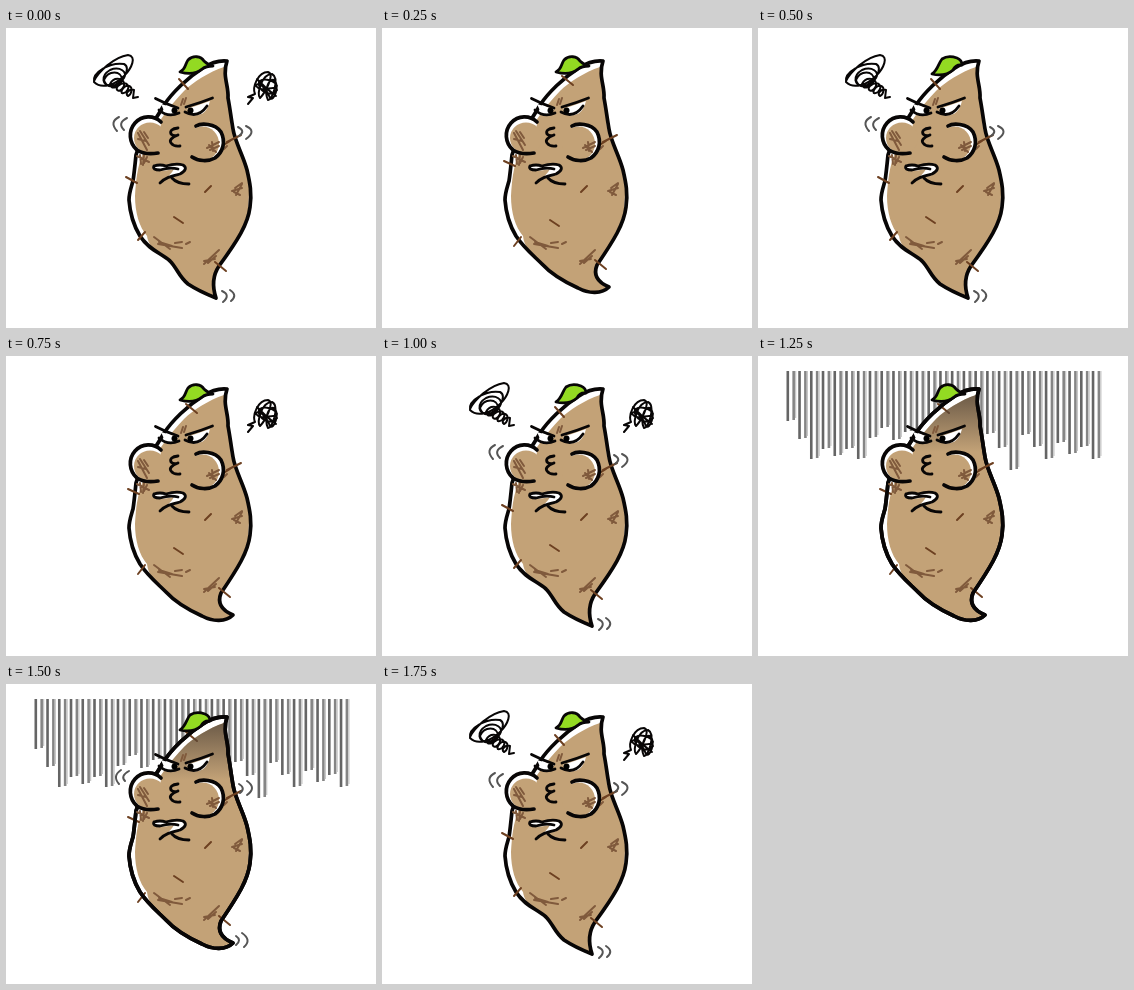
An HTML page for the animation above (2 s loop, 370 by 300 pixels).

```html
<!DOCTYPE html>
<html lang="en">
<head>
<meta charset="utf-8">
<title>Sulking sweet potato</title>
<style>
html, body { margin: 0; width: 100%; height: 100%; overflow: hidden; background: #fff; }
svg { display: block; width: 370px; height: 300px; }
path { fill: none; stroke-linecap: round; stroke-linejoin: round; }
.ink { stroke: #080606; stroke-width: 3.7; }
.mid { stroke-width: 2.8; }
.fine { stroke-width: 2; }
.hair { stroke: #6d4021; stroke-width: 2; }
.rough { stroke: #805a3c; stroke-width: 2; }
.shake { stroke: #555; stroke-width: 2; }
.white { fill: #fff; }
.tan { fill: #c3a277; }
.leaf { fill: #93da22; stroke: #080606; stroke-width: 2.8; }
</style>
</head>
<body>
<svg id="stage" viewBox="0 0 370 300"></svg>
<script>
const stage = document.getElementById('stage');
const path = (cls, d) => `<path class="${cls}" d="${d}"/>`;
const group = (id, inner) => `<g id="${id}">${inner}</g>`;

// Outline and colour fill share their upper parts; only the tail swings.
const head = 'M221 33C211 32 203 36 197 40C181 50 166 65 158 77C148 95 134 112 130 127C129 137 128 147 127 153C125 160 123 165 123 172C124 186 128 198 134 208';
const right = 'C232 212 242 196 244 179C246 165 244 155 241 142C237 127 229 114 227 101C225 90 224 80 222 70C223 58 216 48 221 33Z';
const fillHead = 'M218 39C203 44 187 54 178 63C164 78 148 97 137 125C131 140 130 152 129 168C129 184 133 199 141 208';
const fillRight = 'C226 220 237 202 242 184L244 150L225 100L220 45Z';
const tails = {
  up: 'C143 222 155 225 164 233C171 240 173 249 182 256C191 262 200 266 210 270C206 258 207 247 213 238',
  side: 'C142 220 151 227 160 236C171 248 185 255 196 260C207 266 220 266 227 259C215 254 211 247 215 237'
};
const hairs = {
  up: 'M173 51L182 61M120 149L131 155M132 212L139 204M209 234L220 243M168 189L177 195',
  side: 'M180 48L191 57M122 133L133 138M132 218L139 209M213 232L224 241M168 192L177 198'
};
const shakes = {
  up: 'M113 89Q103 94 111 103M121 90Q111 95 118 102M232 99Q240 103 233 108M240 98Q251 103 240 111M216 263Q225 267 217 274M224 262Q232 267 225 273',
  side: 'M115 86Q106 92 113 100M123 87Q114 92 119 97M233 100Q240 104 234 109M241 97Q251 104 241 111M230 252Q236 256 230 261M236 249Q246 256 238 263'
};
const outline = name => head + tails[name] + right;
const filling = name => fillHead + tails[name] + fillRight;

const torso = name => group(name,
  `<clipPath id="clip-${name}"><path d="${outline(name)}"/></clipPath>` +
  path('white', outline(name)) +
  `<g clip-path="url(#clip-${name})">${path('tan', filling(name))}</g>` +
  path('ink', outline(name)) + path('hair', hairs[name]));

const shadow = `<linearGradient id="gloom" gradientUnits="userSpaceOnUse" x1="0" y1="34" x2="0" y2="96">
  <stop stop-color="#55483b" stop-opacity=".85"/><stop offset="1" stop-color="#55483b" stop-opacity="0"/></linearGradient>
  <g clip-path="url(#clip-side)"><path d="${filling('side')}" style="fill:url(#gloom)"/></g>` +
  path('ink', outline('side'));

// Lengths of the gloomy stripes, left to right, one per pair.
const drops = [65, 83, 103, 93, 100, 93, 103, 82, 72, 84, 76, 90, 80, 88, 76, 90, 84, 78, 92, 114, 79, 91, 103, 87, 98, 91, 103];
function rain() {
  let out = '';
  for (let i = 0; i < 54; i++) {
    const x = 29.8 + i * 5.87;
    const end = drops[i >> 1] - (i % 2 ? 1 : 0);
    out += `<rect x="${x - 1.3}" y="15" width="2.6" height="${end - 15}" fill="${i % 2 ? '#858585' : '#656565'}"/>`;
    if (i % 2) out += `<rect x="${x + 1.3}" y="15" width="1.3" height="${end - 17}" fill="#c8c8c8"/>`;
  }
  return out;
}

const cheekLeft = 'M155 94C148 87 136 87 129 95C122 103 123 115 131 122C137 126 146 126 152 125';
const cheekRight = 'M190 98C195 95 209 95 215 104C220 114 217 124 209 130C202 134 192 133 186 129';
const cheeks =
  path('white', cheekLeft + 'Z') +
  '<ellipse class="tan" cx="144" cy="110" rx="16" ry="15.5"/>' +
  path('white', cheekRight + 'Z') +
  '<ellipse class="tan" cx="196.500" cy="115.500" rx="16.500" ry="17"/>' +
  path('rough', 'M132 105L141 122M134 103L143 117M138 104L142 110M132 111L140 113M131 128L143 134M134 127L135 136M138 127L137 137M141 129L138 135M201 120L213 114M203 117L210 124M204 122L213 118M206 114L207 123M218 121L221 118') +
  path('ink', cheekLeft) + path('ink', cheekRight);

const face =
  path('white', 'M155 76L172 81Q168 89 160 87Z') + path('white', 'M181 81L204 73Q200 89 187 87Z') +
  path('ink mid', 'M153 82Q162 90 173 85M179 84Q192 91 201 78') +
  '<circle cx="168.500" cy="82.500" r="3"/><circle cx="184.500" cy="82.500" r="3"/>' +
  path('ink mid', 'M149.500 70.500Q160 76 172 80M180 79Q194 75 206.500 70') +
  path('rough', 'M175 77L177 71M178 76L180 70') +
  path('ink mid', 'M172 100Q163 101 165 106Q168 109 172 107Q162 111 165 115Q168 119 174 118');

const arms =
  path('white', 'M148 137Q163 138 178 137Q181 142 172 146L156 153Q165 147 168 141Q152 144 148 141Z') +
  path('ink mid', 'M148 138Q154 136 160 138Q170 135 177 137Q183 141 174 146C166 148 160 149 154 155M148 138Q146 142 154 142Q164 139 172 141M166 150Q171 156 183 156');

const spots =
  path('hair', 'M221 114L235 107M199 164L205 158M216 118L224 113') +
  path('rough', 'M226 163L236 160M229 160L236 155M230 167L236 156M228 164L234 167M148 209L164 221M152 216L176 220M153 214L166 218M169 215L176 214M180 216L184 214M198 236L213 222M198 233L209 231M202 235L210 228');

const scribbleLeft = 'M88 53C92 44 108 29 122 27C131 28 126 40 118 48C110 56 96 62 88 54C86 44 104 34 118 36C126 40 116 56 106 58C96 58 94 48 104 42C114 38 122 44 118 50C110 62 100 60 98 52C102 42 116 42 116 52C114 60 104 62 104 56C108 48 120 50 118 58C114 66 108 62 112 58C120 52 126 58 120 64C114 68 114 62 120 58C128 56 126 66 122 68C118 66 124 60 128 62L127 70L132 69';
const scribbleRight = 'M249 66C246 59 252 44 262 44C270 46 258 66 254 70C250 66 256 46 266 46C274 50 266 73 262 72C258 64 262 50 268 52C274 58 268 74 264 70C260 60 252 52 250 58C256 66 268 56 271 62C264 70 251 62 253 54C258 48 270 54 271 58M251 51Q259 60 270 68M249 66L242 69L247 70L242 76';

const leaves = [
  'M174 44C180 41 179 36 182 32C187 27 195 28 198 33Q202 37 207 38Q200 38 196 41Q188 48 174 44Z',
  'M174 46C180 42 180 36 184 31Q190 27 199 30Q204 32 204 37Q198 36 195 42Q187 49 174 46Z'
];

stage.innerHTML =
  group('rain', rain()) + torso('up') + torso('side') + group('shadow', shadow) +
  leaves.map((d, i) => group('leaf' + i, path('leaf', d))).join('') +
  spots + cheeks + face + arms +
  group('shake-up', path('shake', shakes.up)) + group('shake-side', path('shake', shakes.side)) +
  group('left', path('ink fine', scribbleLeft)) + group('right', path('ink fine', scribbleRight));

// Visible layers for each quarter second.
const steps = [
  'up leaf0 shake-up left right',
  'side leaf0',
  'up leaf1 shake-up left',
  'side leaf0 right',
  'up leaf1 shake-up left right',
  'side leaf0 rain shadow',
  'side leaf1 shake-side rain shadow',
  'up leaf0 shake-up left right'
].map(s => s.split(' '));
const layers = [...stage.querySelectorAll(':scope > g[id]')];

function draw() {
  const shown = steps[Math.floor(performance.now() % 2000 / 250)];
  for (const g of layers) g.style.visibility = shown.includes(g.id) ? 'visible' : 'hidden';
  requestAnimationFrame(draw);
}
draw();
</script>
</body>
</html>
```
